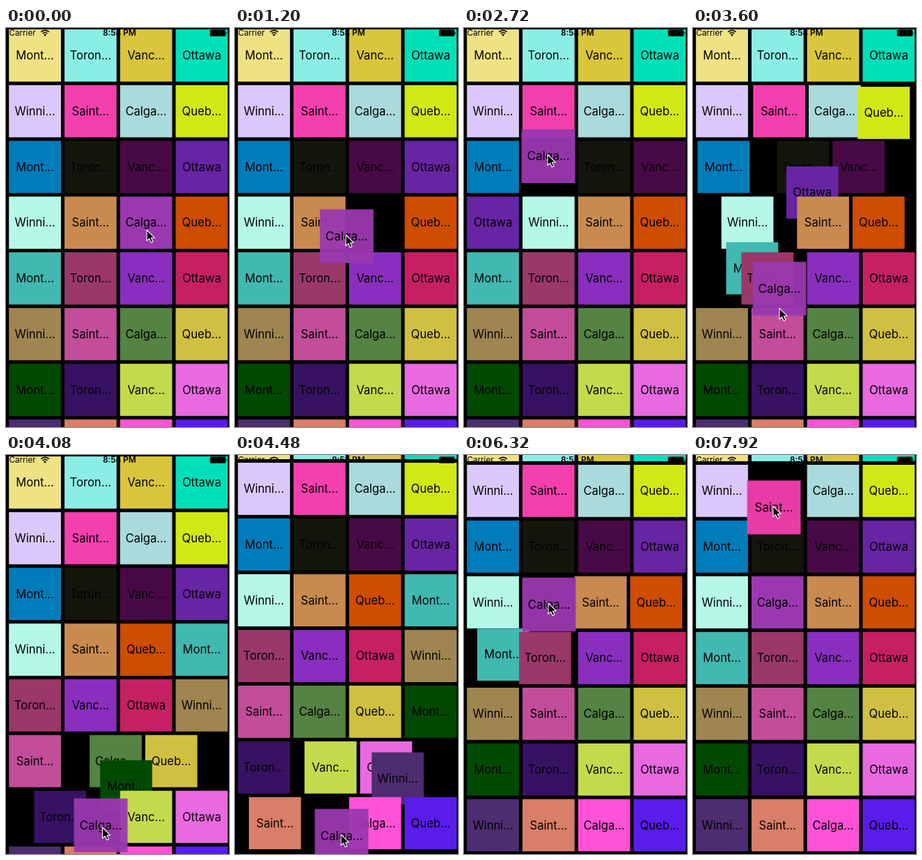
Animation of 320 by 571 pixels, one loop 8000 ms. Source, as an HTML page:

```html
<!DOCTYPE html>
<html lang="en">
<head>
<meta charset="utf-8">
<title>Reorderable grid</title>
<style>
html, body { margin: 0; width: 100%; height: 100%; overflow: hidden; background: #000; }
svg { display: block; width: 100vw; height: 100vh; }
text { font-family: Inter, "Liberation Sans", sans-serif; }
.tile text { font-size: 16.6px; text-anchor: middle; }
</style>
</head>
<body>
<svg viewBox="0 0 320 571">
  <rect width="320" height="571"/>
  <g id="grid"></g>
  <g id="status">
    <text x="4.6" y="11" font-size="11.6">Carrier</text>
    <path d="M50.3 5.6a8.2 8.2 0 0 1 11.4 0M52.6 8a5 5 0 0 1 6.8 0" fill="none" stroke="#000" stroke-width="1.7"/>
    <path d="M56 11.8l-2-2.1a2.9 2.9 0 0 1 4 0z"/>
    <text x="162.8" y="11" font-size="11.8" font-weight="600" text-anchor="middle">8:58 PM</text>
    <rect x="292.8" y="2.6" width="22.4" height="9.2" rx="1.6"/>
    <path d="M316 5.4q2 1.8 0 3.6z"/>
  </g>
  <path id="cursor" d="M0 0V15.6L3.6 12.3L6.2 18L8.9 16.8L6.4 11.3H11.3Z" stroke="#fff" stroke-width="1.1" stroke-linejoin="round"/>
</svg>
<script>
const LOOP = 8000, STEP = 80;
const LEFT = 4.2, TOP = 2, PITCH = 79.75, SIZE = 74.7;
const FOLLOW = 80;   // how far a lifted tile trails the pointer, ms
const REACT = 115;   // how far the reordering trails it
const SHIFT = 300;   // time a tile takes to reach its new slot
const LIFT = 240;

const NAMES = ["Mont…", "Toron…", "Vanc…", "Ottawa", "Winni…", "Saint…", "Calga…", "Queb…"];
const COLORS = (
  "efe284 8aeee4 d9c63c 00e0b8 dac8fb f440ae aadadb d2e814 " +
  "007cbb 13160d 480a46 6724a3 b5f8e8 c98a50 9b38b0 ce4d00 " +
  "41b8b0 9a3869 8a2ebf c72062 9f8650 c24d99 548343 d0c041 " +
  "004900 371263 c3db4b e96ae0 4e2c70 d97e68 ff52d6 5a1ceb").split(" ");

// Lift and drop times of the dragged tiles
const HELD = 14, NEXT = 5;
const GRABS = { [HELD]: [640, 6480], [NEXT]: [7440, 2 * LOOP] };

// Turning points of the pointer: time, x, y
const POINTER = [[720, 202, 289], [1120, 159.3, 296], [1200, 159, 296], [1560, 122, 293],
  [2640, 120, 181.5], [2720, 120, 181], [2980, 121, 135], [3218, 122, 161.5],
  [3326, 122, 241], [3401, 123, 321], [3520, 123, 371], [3600, 124, 401],
  [4000, 135, 528], [4400, 152, 543], [4480, 152, 543], [4940, 206, 487],
  [5360, 210, 394], [5440, 210, 379], [6240, 121, 212], [6560, 121, 212],
  [6960, 118, 66], [7840, 115, 73]];
const SCROLL = [[4160, 0], [4440, 70.7], [4480, 70.7], [4720, 67.75]];

const ease = u => (1 - Math.cos(Math.PI * Math.min(1, Math.max(0, u)))) / 2;
const mix = (a, b, k) => a + (b - a) * k;
const centre = s => [
  LEFT + PITCH * (s % 4) + SIZE / 2,
  TOP + PITCH * Math.floor(s / 4) + SIZE / 2
];

// Smooth curve through the keys without overshoot
function along(keys, t, n) {
  const last = keys.length - 1;
  t = Math.max(keys[0][0], Math.min(t, keys[last][0]));
  let i = 0;
  while (i < last - 1 && t >= keys[i + 1][0]) i++;
  const rate = j => j < 0 || j >= last ? 0
    : (keys[j + 1][n] - keys[j][n]) / (keys[j + 1][0] - keys[j][0]);
  const slope = j => {
    const a = rate(j - 1), b = rate(j);
    return a * b <= 0 ? 0 : 2 * a * b / (a + b);
  };
  const p = keys[i], q = keys[i + 1], h = q[0] - p[0];
  const u = (t - p[0]) / h, v = 1 - u;
  return mix(p[n], q[n], u * u * (3 - 2 * u)) + h * u * v * (slope(i) * v - slope(i + 1) * u);
}

const pointer = t => [along(POINTER, t, 1), along(POINTER, t, 2)];
const scrollAt = t => along(SCROLL, t, 1);

// Slot below the pointer, or -1 in the gaps
function slotUnder(t) {
  const [px, py] = pointer(t - REACT);
  const x = px - LEFT, y = py + scrollAt(t) - TOP;
  if (x % PITCH > SIZE || y % PITCH > SIZE) return -1;
  return Math.floor(y / PITCH) * 4 + Math.floor(x / PITCH);
}

// Each new slot the held tile claims, with its time
function findMoves() {
  const moves = [], [lift, drop] = GRABS[HELD];
  let claimed = HELD;
  for (let t = lift; t < drop; t++) {
    const s = slotUnder(t);
    if (s >= 0 && s !== claimed) moves.push([t, claimed = s]);
  }
  return moves;
}
const moves = findMoves();

function slotOf(i, claimed) {
  if (i === HELD) return claimed;
  const j = i > HELD ? i - 1 : i;
  return j >= claimed ? j + 1 : j;
}

// Overlapping shifts add up
function restingPlace(i, t) {
  let [x, y] = centre(i), from = i;
  for (const [start, claimed] of moves) {
    if (t <= start) break;
    const to = slotOf(i, claimed), k = ease((t - start) / SHIFT);
    const [ax, ay] = centre(from), [bx, by] = centre(to);
    x += (bx - ax) * k;
    y += (by - ay) * k;
    from = to;
  }
  return [x, y];
}

const grid = document.getElementById("grid");
const cursor = document.getElementById("cursor");

function add(parent, tag, attrs) {
  const el = document.createElementNS("http://www.w3.org/2000/svg", tag);
  for (const k in attrs) el.setAttribute(k, attrs[k]);
  return parent.appendChild(el);
}

const tiles = COLORS.map((c, i) => {
  const g = add(grid, "g", { class: "tile" });
  add(g, "rect", { x: -SIZE / 2, y: -SIZE / 2, width: SIZE, height: SIZE, fill: "#" + c });
  add(g, "text", { y: 5.8 }).textContent = NAMES[i % NAMES.length];
  return g;
});
grid.append(tiles[NEXT], tiles[HELD]);

function draw(t) {
  const scroll = scrollAt(t), [fx, fy] = pointer(t - FOLLOW);
  tiles.forEach((el, i) => {
    const [lift, drop] = GRABS[i] || [LOOP, LOOP];
    const lifted = ease((t - lift) / LIFT) * (1 - ease((t - drop) / LIFT));
    const [hx, hy] = restingPlace(i, t);
    const x = mix(hx, fx + 1, lifted), y = mix(hy - scroll, fy + 2, lifted);
    el.setAttribute("transform", `translate(${x} ${y}) scale(${1 + 0.03 * lifted})`);
    el.setAttribute("opacity", 1 - 0.05 * lifted);
  });
  cursor.setAttribute("transform", `translate(${pointer(t)})`);
}

const begin = performance.now();
function tick() {
  const t = (performance.now() - begin) % LOOP;
  draw(Math.floor(t / STEP) * STEP);
  requestAnimationFrame(tick);
}
draw(0);
requestAnimationFrame(tick);
</script>
</body>
</html>
```
